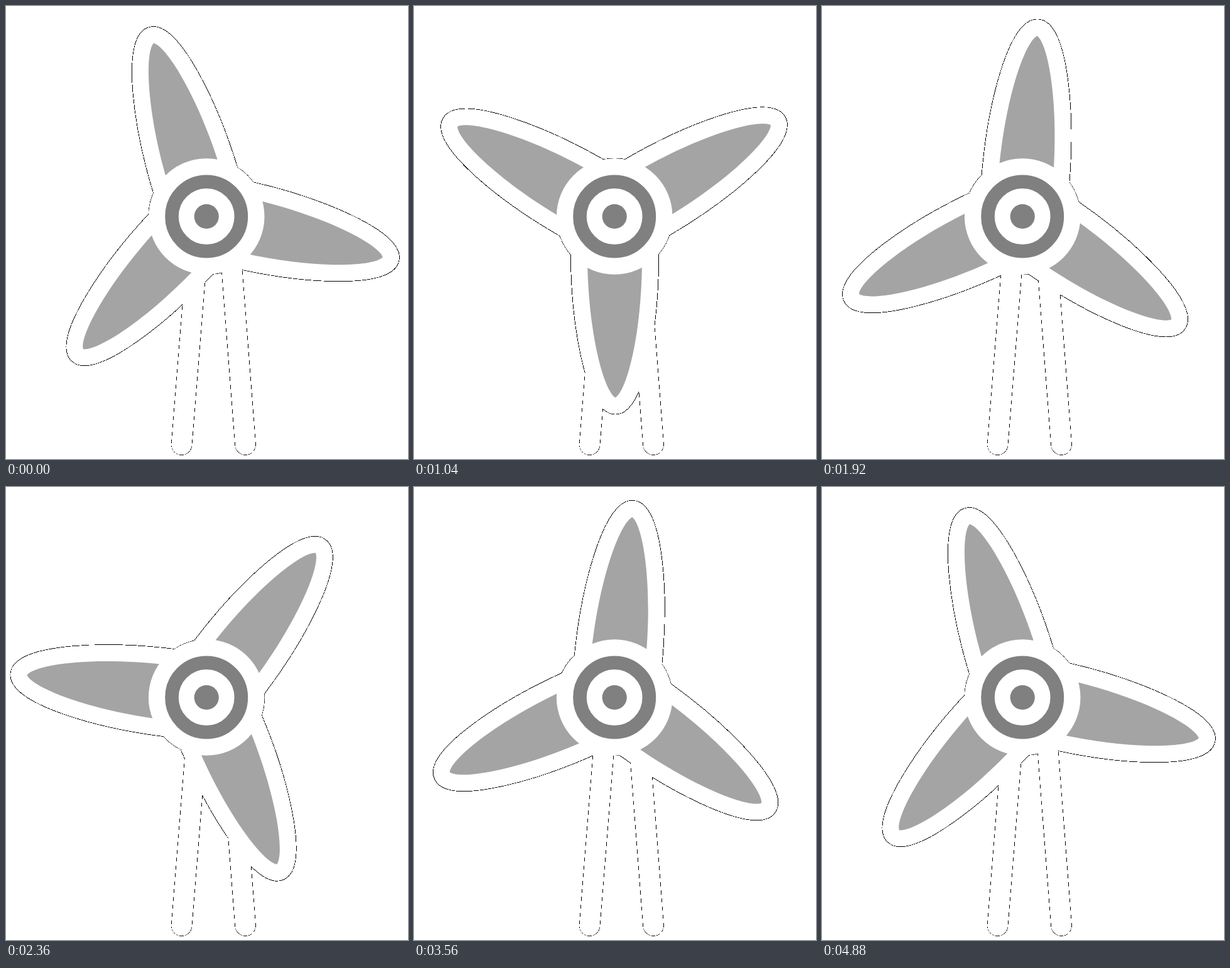
These frames come from a looping animation (640x720 px, 4920 ms). An HTML page:

```html
<!DOCTYPE html>
<html lang="en">
<head>
<meta charset="utf-8">
<title>Wind turbine</title>
<style>
  html, body { margin: 0; height: 100%; overflow: hidden; background: #fff; }
  svg { display: block; }
  .outline { --edge: 1px; color: #000; }
  .white { --edge: 0px; color: #fff; }
  .outline, .white { fill: currentColor; stroke: currentColor; stroke-linejoin: round; stroke-linecap: round; shape-rendering: crispEdges; }
  .rim { stroke-width: calc(52.2px + 1.6 * var(--edge)); }
  .legs { stroke-width: calc(32.4px + var(--edge)); }
</style>
</head>
<body>
<svg width="640" height="720" viewBox="0 0 640 720">
  <defs>
    <path id="blade" d="M-43.6-40V-60C-43.6-185-18.3-277 0-288C18.3-277 43.6-185 43.6-60V-40Z"/>
    <g id="rotor">
      <use href="#blade"/>
      <use href="#blade" transform="rotate(120)"/>
      <use href="#blade" transform="rotate(240)"/>
    </g>
    <g id="silhouette">
      <path class="legs" d="M-39.6 362.7L-10.5 0M61.9 362.7L33.9 0"/>
      <circle class="rim" r="66"/>
      <use class="rim" href="#rotor"/>
    </g>
  </defs>
  <g transform="translate(319.2 334.5)">
    <use class="outline" href="#silhouette"/>
    <use class="white" href="#silhouette"/>
    <use href="#rotor" fill="#a4a4a4"/>
    <circle r="92.3" fill="#fff"/>
    <circle r="55.2" fill="none" stroke="#808080" stroke-width="21.6"/>
    <circle r="19.6" fill="#808080"/>
  </g>
</svg>
<script>
  const LOOP = 4920, STEP = 40, START_ANGLE = -17;
  const STEPS_PER_TURN = LOOP / STEP - 1; // the last step repeats the first pose
  const rotor = document.getElementById('rotor');

  function draw() {
    const step = Math.floor(performance.now() % LOOP / STEP);
    rotor.setAttribute('transform', `rotate(${START_ANGLE + 360 * step / STEPS_PER_TURN})`);
    requestAnimationFrame(draw);
  }
  draw();
</script>
</body>
</html>
```
